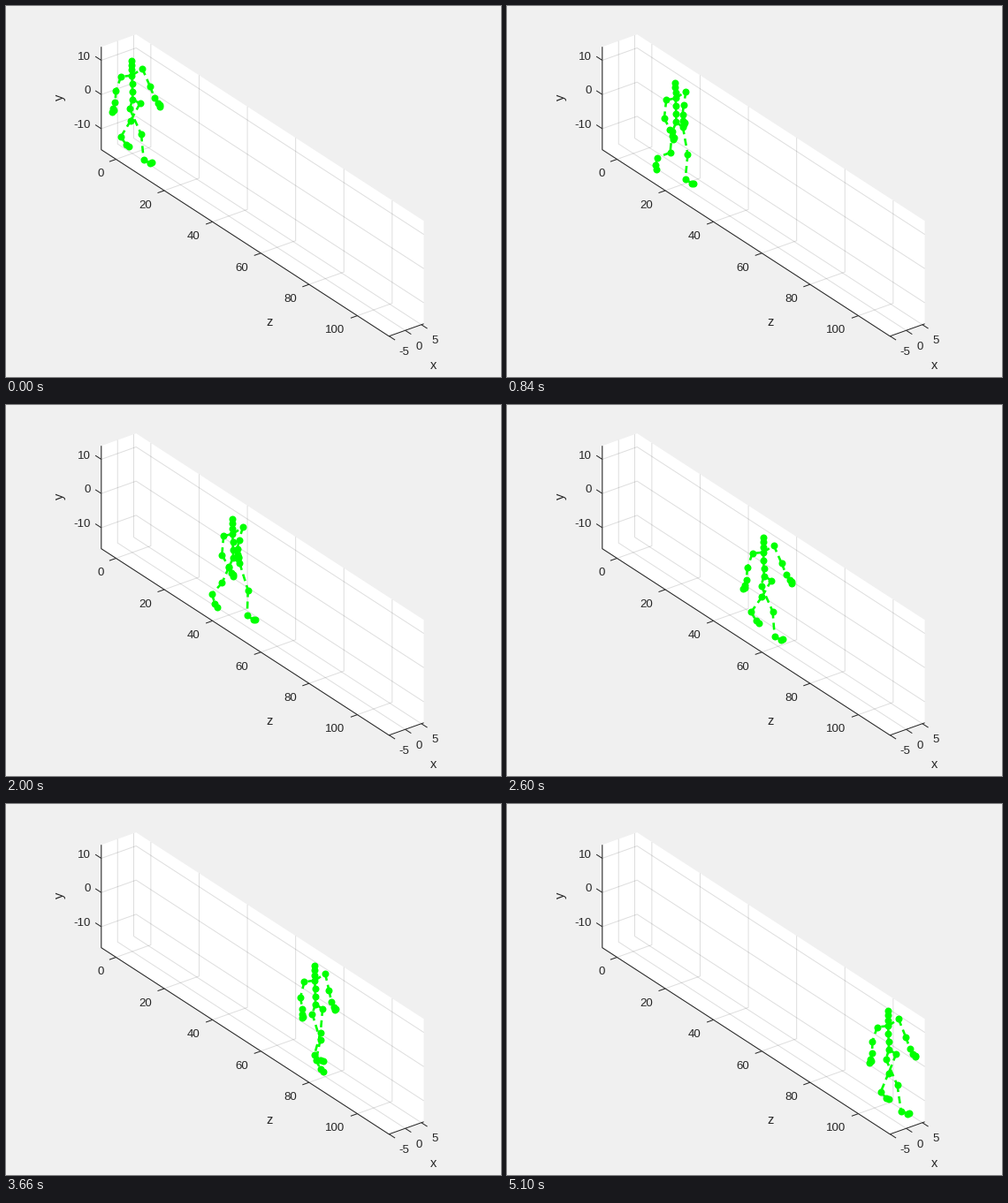
These frames come from a looping animation (560 px wide and 420 px high, 5120 ms). A matplotlib script:

```python
import numpy as np
import matplotlib.pyplot as plt
from matplotlib.animation import FuncAnimation
from matplotlib.collections import LineCollection

W, H, DPI = 560, 420, 80
FRAMES, STEP = 256, 20
CYCLE = 1.29                      # seconds per walking cycle
PX = 72 / DPI                     # points per pixel
GREEN, INK = "#00ff00", "#262626"

plt.rcParams["font.family"] = "Liberation Sans"
fig = plt.figure(figsize=(W / DPI, H / DPI), dpi=DPI, facecolor="#f0f0f0")
ax = fig.add_axes([0, 0, 1, 1])
ax.set_xlim(0, W)
ax.set_ylim(H, 0)
ax.axis("off")

# --- box with grid, in an oblique projection ---
X0, X1, Y0, Y1, Z0, Z1 = -5.05, 5.75, -16.15, 13.95, -6.1, 113.1
CORNER = np.array([107.8, 162.7])
UX, UY, UZ = np.array([[3.65, -1.3], [0, -3.87], [2.73, 1.771]])


def project(x, y, z):
    return CORNER + (x - X0) * UX + (y - Y0) * UY + (z - Z0) * UZ


def stroke(points, alpha=1.0):
    ax.plot(*np.array(points).T, color=INK, alpha=alpha, lw=PX,
            solid_capstyle="butt")


def grid(*corners):
    stroke([project(*c) for c in corners], alpha=0.15)


def tick(start, direction):
    stroke([start, start + 8 * direction / np.hypot(*direction)])


def label(x, y, text, ha, size=13.3):
    ax.text(x, y + 0.36 * size, text, ha=ha, va="baseline", color=INK,
            fontsize=size * PX)


outline = [(X0, Y0, Z0), (X0, Y1, Z0), (X1, Y1, Z0),
           (X1, Y1, Z1), (X1, Y0, Z1), (X0, Y0, Z1)]
ax.fill(*np.array([project(*c) for c in outline]).T, color="white", lw=0)

for z in range(0, 101, 20):
    grid((X0, Y0, z), (X1, Y0, z), (X1, Y1, z))
    p = project(X0, Y0, z)
    tick(p, -UX)
    label(p[0] - 13.8, p[1] + 15, str(z), "right")
for y in (-10, 0, 10):
    grid((X0, y, Z0), (X1, y, Z0), (X1, y, Z1))
    p = project(X0, y, Z0)
    tick(p, -UZ)
    label(p[0] - 12, p[1] - 5.5, str(y), "right")
for x in (-5, 0, 5):
    grid((x, Y1, Z0), (x, Y0, Z0), (x, Y0, Z1))
    p = project(x, Y0, Z1)
    tick(p, UZ)
    label(p[0] + 11.4, p[1] + 16.8, str(x), "left")

stroke([project(*c) for c in
        [(X0, Y1, Z0), (X0, Y0, Z0), (X0, Y0, Z1), (X1, Y0, Z1)]])
label(298, 356.5, "z", "center", 14.7)
label(483.5, 405.5, "x", "center", 14.7)
ax.text(61, 103.7, "y", rotation=90, ha="center", va="center", color=INK,
        fontsize=14.7 * PX)

# --- walking figure ---
RIGHT, LEFT = -1, 1

# leg angles from straight down, in degrees, at ten even steps of the cycle
THIGH = [36, 30, 13, 2, -12, -27, -23, 0, 17, 31]
SHANK = [4, 0, -11, -16, -18, -30, -49, -56, -35, 6]
FOOT = [95, 88, 87, 82, 76, 62, 2, -8, 20, 85]

# elbow, wrist, fingertip from the shoulder: middle and swing, in pixels
ARM = {
    RIGHT: ([(-3.8, 19.2), (-0.5, 32), (0.2, 43)],
            [(-1.9, -2.9), (-6.2, -2.6), (-10.5, -3)]),
    LEFT: ([(2.4, 17.2), (4, 28.7), (7.5, 38.7)],
           [(6.7, 3.2), (10.3, 4.7), (13, 4)]),
}

SPINE_Y = np.array([-44, -39, -33.2, -27, -18, -9, 0])
SPINE = np.stack([0.027 * SPINE_Y, SPINE_Y], axis=1)


def cyc(phase):
    return np.cos(2 * np.pi * phase)


def angle(keys, phase):
    """Periodic curve through evenly spaced keys, in radians."""
    c = 2 * np.fft.rfft(np.radians(keys)) / len(keys)
    c[[0, -1]] /= 2
    return np.sum(c * np.exp(2j * np.pi * np.arange(len(c)) * phase)).real


def limb(length, a, inward=0):
    return length * (np.sin(a) * UZ - np.cos(a) * UY) + inward * UX


def leg(hip, phase, side):
    foot = angle(FOOT, phase)
    parts = [hip,
             limb(7.1, angle(THIGH, phase), -0.45 * side),
             limb(7.3, angle(SHANK, phase), -0.35 * side),
             limb(2.5, foot),
             limb(1.15, foot + np.radians(27))]
    return np.cumsum(parts, axis=0)


def arm(shoulder, phase, side):
    middle, swing = np.array(ARM[side])
    beat = np.array([cyc(phase - 0.04), cyc(phase + 0.02)])
    elbow, wrist, tip = shoulder + middle + swing * beat
    palm = wrist + 0.62 * (tip - wrist)
    thumb = palm + 0.6 * (tip - palm) + [1, 0]
    return np.array([shoulder, elbow, wrist, palm, tip, thumb])


def pose(t):
    phase = t / CYCLE
    c = cyc(phase)
    root = np.array([143.2 + 56.7 * t + 0.7 * cyc(2 * phase - 0.25),
                     103.6 + 33.9 * t + 2 * cyc(2 * phase)])
    return np.vstack([
        root + SPINE,
        arm(root + [-12 - 1.2 * c, -25.2 - 0.4 * c], phase, RIGHT),
        arm(root + [11, -34.7], phase, LEFT),
        leg(root + [-4.1 + 0.9 * c, 10.8], phase, RIGHT),
        leg(root + [7.8 + 0.5 * c, 5.5 - 0.7 * c], phase + 0.5, LEFT)])


def chain(*ids):
    return list(zip(ids[:-1], ids[1:]))


THORAX, PELVIS = 3, 6
BONES = chain(*range(PELVIS, -1, -1))
for s in (7, 13):
    BONES += chain(THORAX, *range(s, s + 5)) + [(s + 3, s + 5)]
for h in (19, 24):
    BONES += chain(PELVIS, *range(h, h + 5))
BONES = np.array(BONES)

LINE = 2.6
bones = LineCollection([], colors=GREEN, linewidths=LINE * PX, zorder=5,
                       linestyles=[(0, (8 / LINE, 5 / LINE))])
ax.add_collection(bones, autolim=False)
dots, = ax.plot([], [], "o", ms=8 * PX, color=GREEN, mew=0, zorder=6)


def draw(i):
    joints = pose(i * STEP / 1000)
    bones.set_segments(joints[BONES])
    dots.set_data(*joints.T)
    return bones, dots


anim = FuncAnimation(fig, draw, frames=FRAMES, interval=STEP, repeat=True,
                     repeat_delay=0, blit=False)
plt.show()
```
